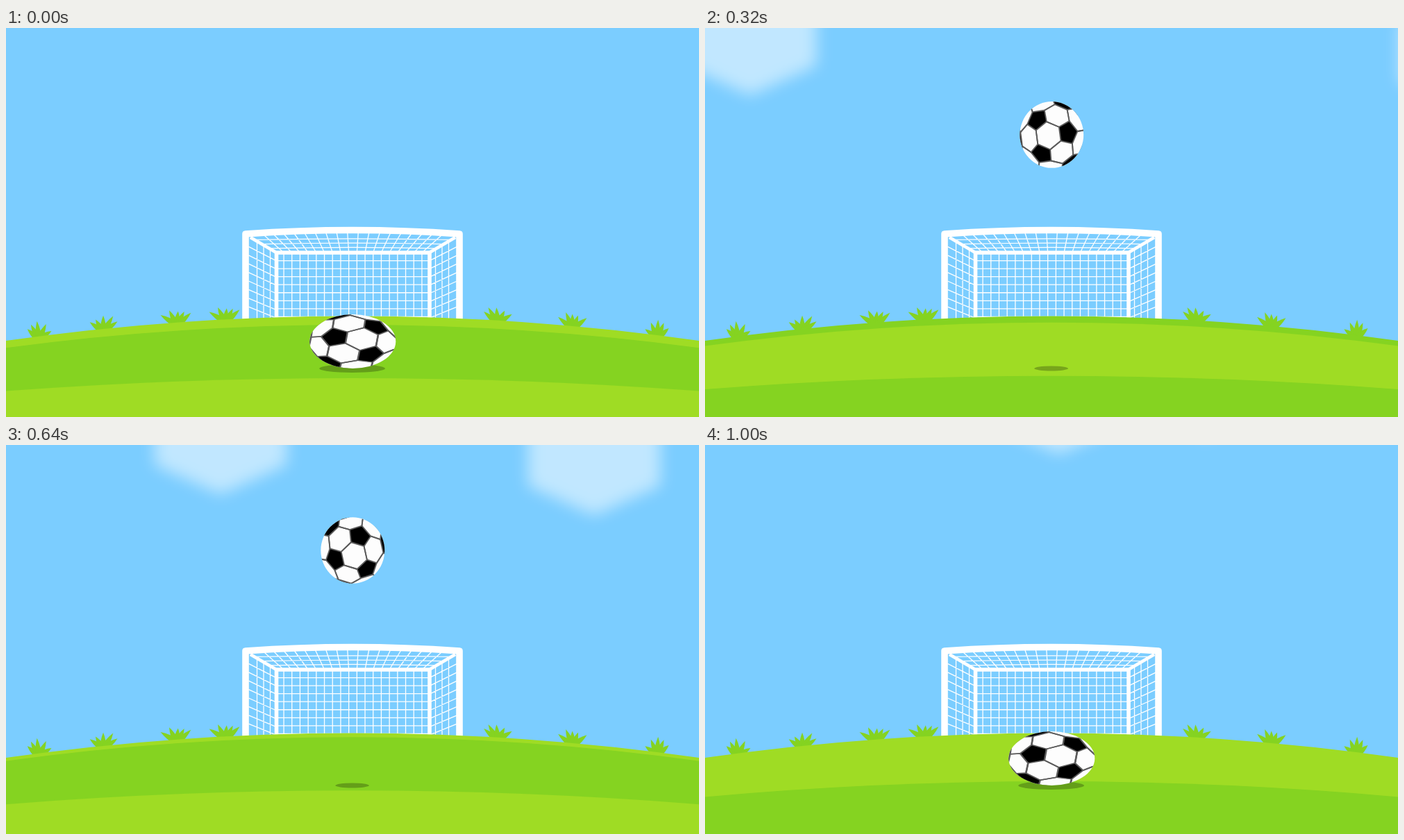
Recreate the animation shown at these times as an HTML page with a canvas. Size 998x561 px, loop 1040 ms.

```html
<!DOCTYPE html>
<html lang="en">
<head>
<meta charset="utf-8">
<title>Bouncing football</title>
<style>
  html, body { margin: 0; width: 100%; height: 100%; overflow: hidden; background: #7bcdff; }
  canvas { display: block; width: 998px; height: 561px; }
</style>
</head>
<body>
<canvas id="stage" width="998" height="561"></canvas>
<script>
const ctx = document.getElementById('stage').getContext('2d');
const W = 998, H = 561, MID = 499.5, TAU = Math.PI * 2;
const LOOP = 1040, STEP = 40, APEX = 480, LAND = 1000;
const SKY = '#7bcdff', LIGHT = '#9fdc24', DARK = '#85d321';
const HILL_TOP = 415.4, HILL_DROP = 35.6;

// Share of the fall covered: 0 at the apex, 1 on the ground.
function fall(t) {
  const x = Math.min(1, t < APEX ? (APEX - t) / APEX : (t - APEX) / (LAND - APEX));
  let lo = 0, hi = 1;
  for (let i = 0; i < 30; i++) {
    const p = (lo + hi) / 2, q = 1 - p;
    if (0.42 * p * q * q + 3 * p * p * q + p * p * p < x) lo = p; else hi = p;
  }
  return hi ** 3;
}

// ---- Clouds: soft hexagons, placed by their lowest tip ----
function cloud(x, y) {
  ctx.save();
  ctx.filter = 'blur(11px)';
  ctx.fillStyle = 'rgba(255,255,255,.53)';
  ctx.beginPath();
  for (let i = 0; i < 6; i++) {
    const a = TAU * i / 6;
    ctx.lineTo(x + 110 * Math.sin(a), y - 80 + 85 * Math.cos(a));
  }
  ctx.fill();
  ctx.restore();
}

function clouds(u) {
  cloud(-240 + 1050 * u - 300 * u * u, 343 - 1386 * u + 2270 * u ** 2 - 1219 * u ** 3);
  cloud(1471 - 1375 * u + 625 * u * u, 118 - 375 * (u - 0.4) ** 2);
}

// ---- Goal ----
function stroke(path, width) {
  ctx.lineWidth = width;
  ctx.stroke(new Path2D(path));
}

function goal() {
  ctx.strokeStyle = '#fff';
  ctx.lineJoin = 'round';
  const cell = 11.7;
  let net = '';
  for (let d = cell / 2; d < 108; d += cell) {
    for (const s of [-1, 1]) net += `M${MID + s * d * 1.34} 294L${MID + s * d} 324V420`;
  }
  for (let i = 1; i < 9; i++) net += `M389 ${324 + i * 11.55}H610`;
  for (let i = 1; i < 4; i++) {
    const y = 298 + i * 6.3, w = 148 - i * 9.5;
    net += `M${MID - w} ${y + 1}Q${MID} ${y - 2} ${MID + w} ${y + 1}`;
  }
  for (const s of [-1, 1]) {
    const x = d => MID + s * d;
    for (let i = 1; i < 9; i++) net += `M${x(150)} ${303 + i * 12.4}L${x(110)} ${324 + i * 11.8}`;
    for (let d = 138; d > 112; d -= 9.5) net += `M${x(d)} ${302 + (148 - d) * 0.58}V425`;
  }
  stroke(net, 1.3);
  stroke('M352 302L389.5 324M647 302L609.5 324', 4.6);
  stroke('M389.5 420V324H610V420', 5.6);
  stroke('M345 425V297Q499 286 653 297V425', 9.6);
}

// ---- Grass: fans of leaves along the hill's edge ----
const jitter = n => Math.sin(n * 127.1) * 0.5;

function leaf(x, y, angle, length) {
  ctx.save();
  ctx.translate(x, y);
  ctx.rotate(angle);
  ctx.beginPath();
  ctx.moveTo(-4.5, 3);
  ctx.quadraticCurveTo(-4.5, -length * 0.5, 0, -length);
  ctx.quadraticCurveTo(4.5, -length * 0.5, 4.5, 3);
  ctx.fill();
  ctx.restore();
}

function grass() {
  ctx.fillStyle = DARK;
  for (const x of [47, 140, 246, 316, 708, 816, 938]) {
    const y = HILL_TOP + HILL_DROP * ((x - MID) / MID) ** 2 + 2;
    for (let i = -2; i <= 2; i++) {
      leaf(x + i * 1.5, y, i * 0.46 + jitter(x + i) * 0.2, 21 + jitter(x * 3 + i) * 6);
    }
  }
}

// ---- Hill with stripes scrolling away ----
function hill(t) {
  const band = 77, start = 428 - 0.251 * t;
  for (let k = Math.floor((HILL_TOP - start) / band); start + k * band < H; k++) {
    const y = Math.max(HILL_TOP, start + k * band);
    const drop = HILL_DROP - 0.19 * (y - HILL_TOP);
    ctx.fillStyle = k & 1 ? LIGHT : DARK;
    ctx.beginPath();
    ctx.moveTo(0, y + drop);
    ctx.quadraticCurveTo(W / 2, y - drop, W, y + drop);
    ctx.lineTo(W, H);
    ctx.lineTo(0, H);
    ctx.fill();
  }
}

// ---- Ball: a truncated icosahedron ----
const dot = (a, b) => a[0] * b[0] + a[1] * b[1] + a[2] * b[2];
const mix = (a, b, m, n) => a.map((v, i) => v * m + b[i] * n);
const unit = a => a.map(v => v / (Math.hypot(...a) || 1));
const cross = (a, b) => [a[1] * b[2] - a[2] * b[1], a[2] * b[0] - a[0] * b[2], a[0] * b[1] - a[1] * b[0]];
const lift = (x, y) => [x, y, Math.sqrt(1 - x * x - y * y)];

function turn(v, axis, angle) {
  const c = Math.cos(angle), along = dot(axis, v) * (1 - c);
  return mix(mix(v, cross(axis, v), c, Math.sin(angle)), axis, 1, along);
}

// Patch centres at rest, built from two neighbouring patches.
function restingPatches() {
  const a = lift(0.39, 0.5), b = lift(-0.52, 0.755);
  const u = unit(mix(a, b, 1, 1)), v = unit(mix(a, b, 1, -1)), w = cross(u, v);
  const phi = (1 + Math.sqrt(5)) / 2, corners = [];
  for (const p of [-phi, phi]) {
    for (const q of [-1, 1]) corners.push([p, q, 0], [0, p, q], [q, 0, p]);
  }
  return corners.map(c => unit(mix(mix(u, v, c[0], c[1]), w, 1, c[2])));
}

const resting = restingPatches();
const hub = resting.reduce((m, c) => c[0] < m[0] ? c : m);

// A fifth of a turn about the leftmost patch, with a wobble on top.
function patches(u) {
  const s = Math.sin(Math.PI * u);
  const pitch = 0.12 * Math.sin(3 * Math.PI * u) - 0.13 * s;
  const yaw = 0.15 * Math.sin(TAU * u) - 0.11 * s * s;
  const roll = -0.37 * s * s;
  const wobble = [-pitch, yaw, roll];
  return resting.map(c => turn(turn(c, hub, -TAU / 5 * u), unit(wobble), Math.hypot(...wobble)));
}

function ball(u, r) {
  const grounded = r > 0.99, zoom = 1.05;
  const stretch = 0.73 * Math.min(r, 0.4);
  const rx = grounded ? 62 : 46.5 * (1 - 0.46 * stretch);
  const ry = grounded ? 39 : 46.5 * (1 + stretch);
  ctx.save();
  ctx.translate(499.3, 141.5 + 310.5 * r);
  ctx.scale(rx, ry);
  ctx.beginPath();
  ctx.arc(0, 0, 1, 0, TAU);
  ctx.fillStyle = '#fdfdfd';
  ctx.fill();
  ctx.clip();
  ctx.scale(zoom, zoom);
  ctx.strokeStyle = '#5c5c5c';
  ctx.lineWidth = 0.037;

  const centres = patches(u);
  const trace = points => {
    ctx.beginPath();
    points.forEach(p => ctx.lineTo(p[0], p[1]));
  };
  for (const c of centres) {
    const near = centres.filter(n => n !== c && dot(n, c) > 0.3);
    for (const n of near) {
      const seam = [unit(mix(c, n, 2, 1)), unit(mix(c, n, 1, 2))];
      if (seam.some(p => p[2] < 0)) continue;
      trace(seam);
      ctx.stroke();
    }
    if (c[2] < 0) continue;
    // Order the neighbours around the patch.
    const e = unit(cross(c, near[0])), f = cross(c, e);
    const angle = n => Math.atan2(dot(n, f), dot(n, e));
    near.sort((m, n) => angle(m) - angle(n));
    trace(near.map(n => unit(mix(c, n, 2, 1))));
    ctx.closePath();
    ctx.fillStyle = '#000';
    ctx.fill();
    ctx.stroke();
  }
  ctx.restore();
}

function shadow(r) {
  ctx.fillStyle = 'rgba(0,0,0,.25)';
  ctx.beginPath();
  ctx.ellipse(498.6, 491, 23.5 + 24 * r, 3.4 + 2.6 * r, 0, 0, TAU);
  ctx.fill();
}

function draw() {
  const t = Math.floor(performance.now() % LOOP / STEP) * STEP;
  const u = t / LAND, r = fall(t);
  ctx.fillStyle = SKY;
  ctx.fillRect(0, 0, W, H);
  clouds(u);
  goal();
  grass();
  hill(t);
  shadow(r);
  ball(u, r);
  requestAnimationFrame(draw);
}
draw();
</script>
</body>
</html>
```
